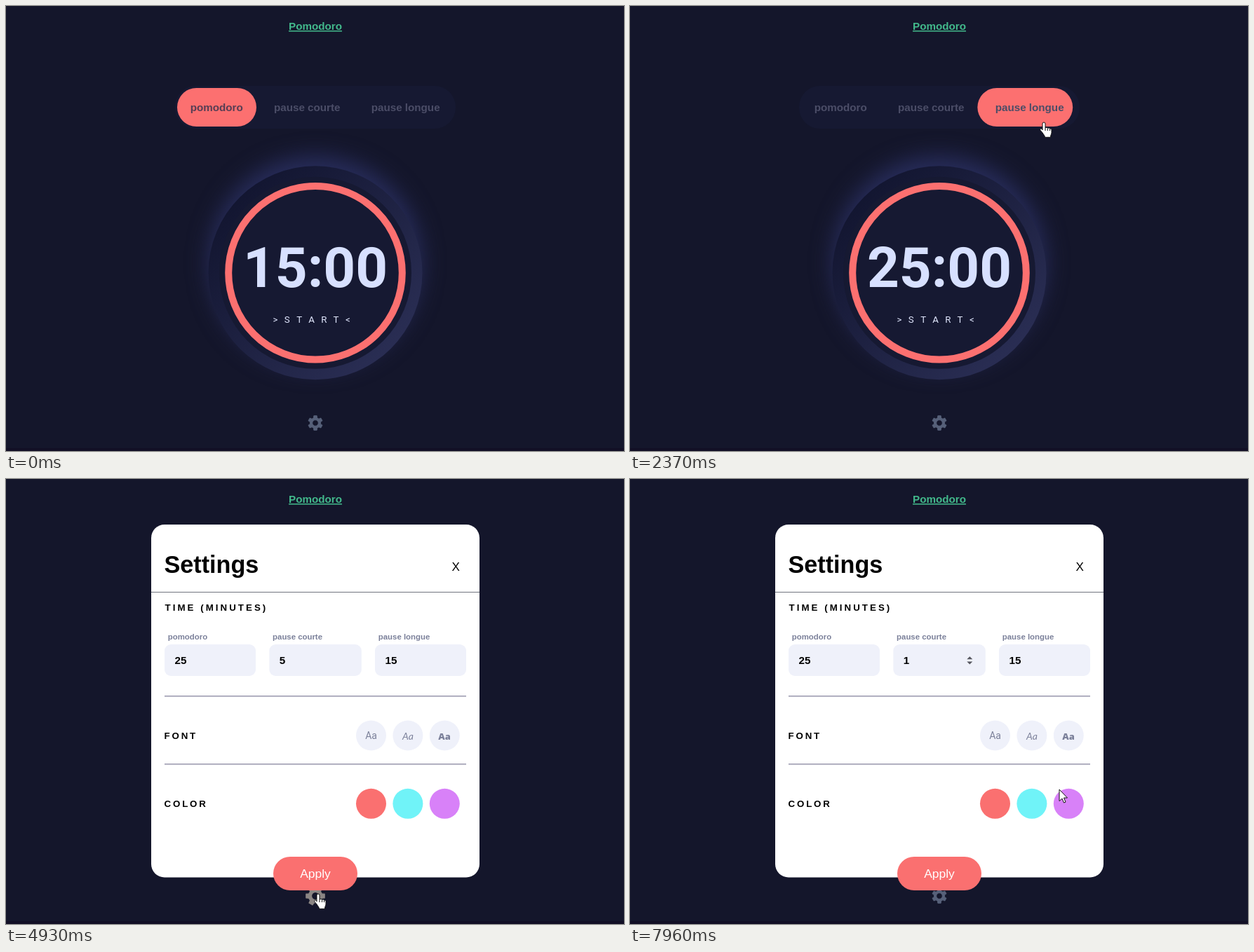
An HTML page that plays this animation: 881x635 px, repeating every 8000 ms.

```html
<!DOCTYPE html>
<html lang="fr">
<head>
<meta charset="utf-8">
<title>Pomodoro</title>
<style>
html, body { margin: 0; width: 100%; height: 100%; overflow: hidden; background: #14162b; }
svg { display: block; width: 881px; height: 635px; }
text { font-family: "Liberation Sans", Arial, sans-serif; white-space: pre; }
.bold { font-weight: 700; }
.mid { text-anchor: middle; }
.roboto { font-family: Roboto, sans-serif; }
.tab { font-size: 15.2px; fill: #4b4d67; }
.head { font-size: 13.3px; letter-spacing: 2.85px; }
.label { font-size: 11.4px; fill: #7b809a; }
.value { font-size: 15.2px; }
.sample { font-size: 14px; fill: #7b809a; }
</style>
</head>
<body>
<svg viewBox="0 0 881 635">
  <defs>
    <linearGradient id="dial" x1="1" y1="1" x2="0" y2="0">
      <stop stop-color="#2e325a"/><stop offset="1" stop-color="#0e112a"/>
    </linearGradient>
  </defs>
  <rect width="881" height="635" fill="#14162b"/>
  <rect y="631" width="881" height="4" fill="#120f25"/>
  <text class="bold mid" x="441" y="34" font-size="15.2" fill="#42b88b" text-decoration="underline">Pomodoro</text>

  <rect x="241" y="114" width="400" height="61" rx="30" fill="#161932"/>
  <rect id="pill" y="117" height="55" rx="27.5" fill="#fc7070"/>
  <g id="tabs" class="bold">
    <text class="tab" x="262.7" y="150">pomodoro</text>
    <text class="tab" x="382" y="150">pause courte</text>
    <text class="tab" x="520.7" y="150">pause longue</text>
  </g>

  <circle cx="441" cy="366" r="152.5" fill="#272c5a" style="filter:blur(15px)"/>
  <circle cx="441" cy="380.8" r="152.5" fill="url(#dial)"/>
  <circle cx="441" cy="380.8" r="137" fill="#161932"/>
  <circle cx="441" cy="380.8" r="123.8" fill="none" stroke="#fc7070" stroke-width="10"/>
  <text id="time" class="bold mid roboto" x="441" y="401" font-size="80" fill="#d7e0ff"></text>
  <text class="roboto" x="380.4" y="452" font-size="13.3" letter-spacing="9.5" fill="#e2e8ff">&gt;START&lt;</text>

  <path id="gear" fill-rule="evenodd" stroke-linejoin="round"/>

  <g id="dialog">
    <rect x="207" y="65" width="468" height="503.5" rx="19" fill="#fff"/>
    <text class="bold" x="225.5" y="134" font-size="34.2">Settings</text>
    <text x="635.5" y="130.5" font-size="17.1">X</text>
    <rect x="207" y="161" width="468" height="1" fill="#70757f"/>
    <text class="bold head" x="226.5" y="188" style="letter-spacing:3.05px">TIME (MINUTES)</text>
    <g id="fields" class="bold"></g>
    <path id="spin" d="M480.3 257.2h8l-4-4zM480.3 260.6h8l-4 4z" fill="#55565e"/>
    <path d="M226 309.8H656M226 406.9H656" stroke="#83819c" stroke-width="1.3"/>
    <text class="bold head" x="225.5" y="371.3">FONT</text>
    <text class="bold head" x="225.5" y="468.3">COLOR</text>
    <g id="dots"></g>
    <text class="sample mid roboto" x="520.5" y="371">Aa</text>
    <text class="sample mid" x="573" y="372" style="font-family:Lato,sans-serif;font-style:italic">Aa</text>
    <text class="sample mid" x="625" y="372" style="font-family:'Open Sans',sans-serif;font-weight:800;font-stretch:75%;font-size:13px">Aa</text>
    <rect x="381" y="539" width="120" height="48" rx="24" fill="#fa7070"/>
    <text class="mid" x="441" y="568.5" font-size="17.4" fill="#fff">Apply</text>
  </g>

  <g id="cursor" stroke-width="1" stroke-linejoin="round">
    <path id="arrow" d="M0 0V16.5L4 13l2.5 6 2.5-1-2.5-6H11.5z" fill="#fff" stroke="#111"/>
    <g id="hand">
      <path d="M-2 2a2 2 0 0 1 4 0v6c1-1 3-1 3.5 .5c1-.8 3-.5 3 .8c1-.5 2.5 0 2.5 1.5v4c0 2-1.5 3-1.5 6.5h-8c0-2-2-4-3.5-6.5l-3-3.5c-1-2 1-3 2.5-1.5l.5 1z" fill="#fff" stroke="#111"/>
      <path d="M2 8v4M5.5 8.5V12M8.5 9.5V12" stroke="#111"/>
    </g>
    <path id="beam" d="M-3 -7H-1L0 -6L1 -7H3M0 -6V6M-3 7H-1L0 6L1 7H3" fill="none" stroke="#222"/>
  </g>
</svg>
<script>
const LOOP = 8000;
const $ = id => document.getElementById(id);
const show = (id, on) => $(id).setAttribute('visibility', on ? 'inherit' : 'hidden');
const set = (el, attrs) => { for (const k in attrs) el.setAttribute(k, attrs[k]); };
const inside = (x, y, l, t, r, b) => x >= l && x <= r && y >= t && y <= b;
const lastAt = (list, t) => list.filter(e => e[0] <= t).pop();

// Settings fields and option circles
$('fields').innerHTML = [[226, 130, 'pomodoro', 25], [375.3, 131.5, 'pause courte', 5], [526, 130, 'pause longue', 15]]
  .map(([x, w, name, n]) => `<text class="label" x="${x + 4.8}" y="228.5">${name}</text>
    <rect x="${x}" y="236" width="${w}" height="45" rx="9" fill="#eff1fa"/>
    <text class="value" x="${x + 14.5}" y="263.7">${n}</text>`).join('');
const shortValue = document.querySelectorAll('.value')[1];

$('dots').innerHTML = ['#fa7070', '#70f3f8', '#d881f8'].map((c, i) => {
  const x = 520.5 + i * 52.4;
  return `<circle cx="${x}" cy="366" r="21.5" fill="#eff1fa"/><circle cx="${x}" cy="463.3" r="21.5" fill="${c}"/>`;
}).join('');

// Six-toothed gear around the origin
const polar = (r, deg) => {
  const a = deg * Math.PI / 180;
  return (r * Math.sin(a)).toFixed(2) + ' ' + (-r * Math.cos(a)).toFixed(2);
};
let teeth = [];
for (let a = 0; a < 360; a += 60)
  teeth.push(polar(7.6, a - 19), polar(10.5, a - 12), polar(10.5, a + 12), polar(7.6, a + 19));
$('gear').setAttribute('d', `M${teeth.join('L')}ZM4.3 0A4.3 4.3 0 1 0 -4.3 0A4.3 4.3 0 1 0 4.3 0Z`);

// CSS "ease" curve
function ease(p) {
  if (p <= 0) return 0;
  if (p >= 1) return 1;
  const bez = (a, b, s) => 3 * a * s * (1 - s) ** 2 + 3 * b * s * s * (1 - s) + s ** 3;
  let lo = 0, hi = 1;
  for (let i = 0; i < 20; i++) {
    const m = (lo + hi) / 2;
    if (bez(.25, .25, m) < p) lo = m; else hi = m;
  }
  return bez(.1, 1, lo);
}

const pills = [[244, 113], [363, 132.5], [502, 136]];
const clocks = ['15:00', '5:00', '25:00'];
const picks = [[-1000, 0, 0], [1210, 0, 1], [2080, 1, 2], [3010, 2, 0]]; // time, from, to
const values = [[0, 5], [6490, 4], [6640, 3], [6950, 2], [7180, 1]];
const OPEN = 4930;

const path = [ // time, x, y
  [140, 725, 465], [760, 408, 151], [1620, 408, 151], [2070, 575, 163], [2370, 590, 166],
  [2450, 590, 166], [2850, 308, 150], [3000, 306, 152], [3140, 321, 238], [3370, 328, 285],
  [3920, 328, 285], [4400, 440, 610], [4610, 444, 592], [4779, 444, 592], [4780, 445, 592],
  [5099, 445, 592], [5100, 446, 592], [5380, 446, 592], [5720, 437, 273], [5860, 431, 271.5],
  [6020, 384, 268], [6340, 480, 264], [6490, 481, 264], [7260, 482, 264], [7560, 482, 264],
  [7950, 612, 443], [8001, 612, 443]
];

function cursorAt(t) {
  const i = Math.max(1, path.findIndex(k => k[0] > t));
  const [t0, x0, y0] = path[i - 1], [t1, x1, y1] = path[i];
  let p = Math.max(0, (t - t0) / (t1 - t0));
  p = p * p * (3 - 2 * p);
  return [Math.round(x0 + (x1 - x0) * p), Math.round(y0 + (y1 - y0) * p)];
}

function draw(t) {
  const [start, from, to] = lastAt(picks, t);
  const p = ease((t - start) / 400);
  const [x, w] = pills[from].map((v, i) => v + (pills[to][i] - v) * p);
  set($('pill'), { x, width: w });
  [...$('tabs').children].forEach((tab, i) => {
    tab.style.fill = i === to && p > .97 ? '#573e54' : '';
  });
  $('time').textContent = clocks[to];

  const open = t >= OPEN;
  const [cx, cy] = cursorAt(t);
  const onGear = Math.hypot(cx - 441, cy - 595) < 14;
  set($('gear'), {
    transform: 'translate(441 595)' + (onGear ? ' rotate(30) scale(1.28)' : ''),
    fill: onGear ? '#8b8684' : '#566079',
    stroke: onGear ? '#8b8684' : '#566079'
  });

  show('dialog', open);
  show('spin', open && t >= 5680);
  shortValue.textContent = lastAt(values, t)[1];

  const onInput = open && inside(cx, cy, 375, 236, 477, 281);
  const onButton = open ? inside(cx, cy, 381, 539, 501, 587) : inside(cx, cy, 244, 117, 638, 172);
  const hand = onGear || onButton;
  $('cursor').setAttribute('transform', `translate(${cx} ${cy})`);
  show('cursor', t >= 140);
  show('hand', hand);
  show('beam', onInput);
  show('arrow', !hand && !onInput);
}

const begin = performance.now();
function tick() {
  draw((performance.now() - begin) % LOOP);
  requestAnimationFrame(tick);
}
tick();
</script>
</body>
</html>
```
